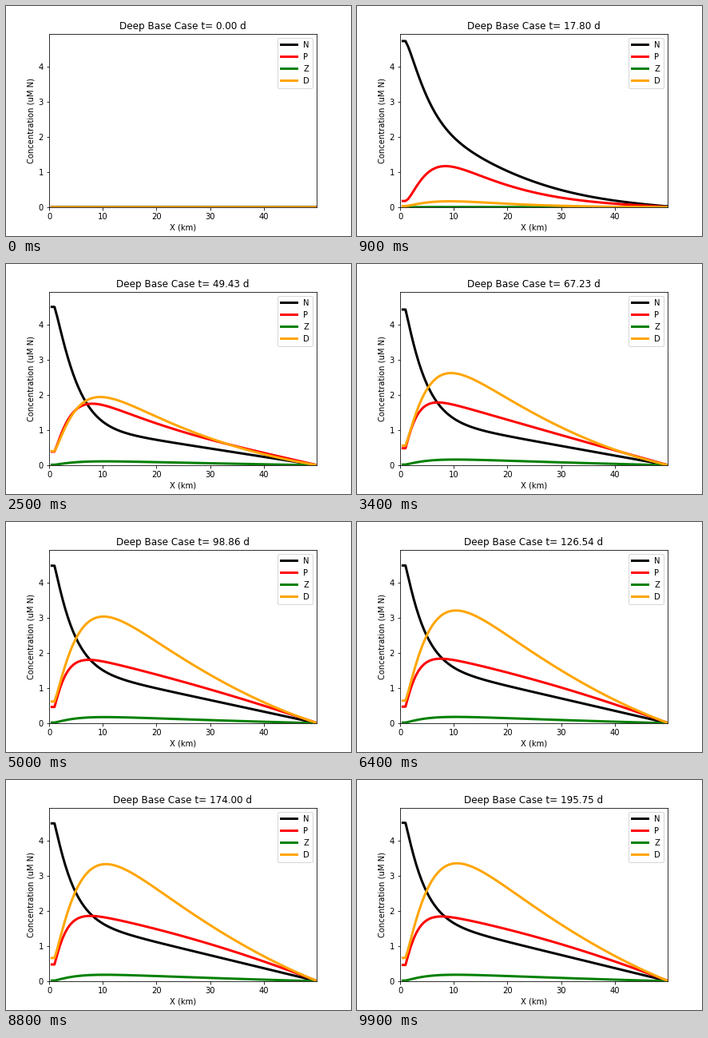
Recreate the animation shown at these times as a matplotlib script. Size 432x288 px, loop 10000 ms.

```python
import math

import matplotlib.pyplot as plt
import numpy as np
from matplotlib.animation import FuncAnimation

FRAMES, INTERVAL = 100, 100
DAYS_PER_FRAME = 1.97725
T_BLOOM, T_LATE = 31.636, 67.23   # days
COLORS = {"N": "black", "P": "red", "Z": "green", "D": "orange"}

x = np.arange(1, 101) * 0.5
xs = np.maximum(x, 1.0)           # the inshore cells are well mixed


def profile(v1, c0, c1, c2, lam, p):
    """Offshore tail falling to zero at 50 km, relaxing from v1 at the coast."""
    def tail(d):
        s = (d - 10) / 10
        return (50 - d) * (c0 + c1 * s + c2 * s * s)
    return tail(xs) + (v1 - tail(1.0)) * np.exp(-((xs - 1) / lam) ** p)


def decay(t):
    return math.exp(-t / 42)


BLOOM = {
    "N": profile(4.62, 0.0183, 0, 0, 4.76, 1.315),
    "P": profile(0.24, 0.0465, -0.01435, 0.00225, 4.15, 1.35),
    "Z": profile(0.005, 0.0009, 0, 0, 4.2, 1.15),
    "D": profile(0.16, 0.0280, -0.00925, 0.00125, 5.06, 1.228),
}
TOTAL = BLOOM["N"] + BLOOM["P"] + BLOOM["D"]
SHARE = {k: BLOOM[k] / np.maximum(TOTAL, 1e-3) for k in "PD"}


def early(t):
    """Nutrient spreads offshore, then the bloom converts it."""
    r = max(t / T_BLOOM, 1e-6)
    spread = np.array([math.erfc((d - 1) / (36 * math.sqrt(r))) for d in xs])
    rise = (1 - math.exp(-t / 5)) / (1 - math.exp(-T_BLOOM / 5))
    total = rise * (r * r * TOTAL + (1 - r * r) * 5.1 * spread)

    def grown(day):
        return 1 / (1 + math.exp(-(day - 15) / 2.5))

    def summed(day):
        return math.log1p(math.exp((day - 15) / 2.5))

    g = grown(t) / grown(T_BLOOM)
    h = summed(t) / summed(T_BLOOM)
    p = total * SHARE["P"] * g
    d = total * SHARE["D"] * h
    return {"N": total - p - d, "P": p, "Z": BLOOM["Z"] * h * rise, "D": d}


def late(t):
    """Slow approach to the steady state with a weak oscillation."""
    e = decay(t)
    w = math.cos(2 * math.pi * (t - 152) / 85)
    return {
        "N": profile(4.495 - 0.25 * e - 0.015 * w, 0.0378 - 0.0512 * e, 0, 0,
                     3.5 + 1.4 * e, 1.1),
        "P": profile(0.48 - 0.06 * e + 0.016 * w,
                     0.0463 - 0.017 * e + 0.0005 * w,
                     0.0037 - 0.0195 * e, 0, 2.2, 1.1),
        "Z": profile(0.02, 0.0052 - 0.0034 * e, -0.0002, 0, 4.2, 1.15),
        "D": profile(0.67 - 0.54 * e, 0.0997 - 0.1292 * e,
                     -0.0088 - 0.005 * e, 0, 4.86 - 3 * e, 1.15),
    }


def state(t):
    if t <= T_BLOOM:
        return early(t)
    end = late(max(t, T_LATE))
    if t >= T_LATE:
        return end
    k = (decay(t) - decay(T_LATE)) / (decay(T_BLOOM) - decay(T_LATE))
    return {n: k * BLOOM[n] + (1 - k) * end[n] for n in COLORS}


fig, ax = plt.subplots(figsize=(6, 4), dpi=72)
fig.subplots_adjust(left=0.125, right=0.9, bottom=0.125, top=0.88)
lines = {n: ax.plot(x, 0 * x, color=c, lw=3, label=n, snap=False)[0]
         for n, c in COLORS.items()}
ax.set_xlim(0, 49.8)
ax.set_ylim(0, 4.94)
ax.set_xlabel("X (km)")
ax.set_ylabel("Concentration (uM N)")
title = ax.set_title("")
ax.legend(loc="upper right")


def update(i):
    t = i * DAYS_PER_FRAME
    for name, y in state(t).items():
        lines[name].set_ydata(y)
    title.set_text(f"Deep Base Case t= {t:.2f} d")
    return [*lines.values(), title]


anim = FuncAnimation(fig, update, frames=FRAMES, interval=INTERVAL,
                     repeat=True, repeat_delay=0, blit=False)
plt.show()
```
